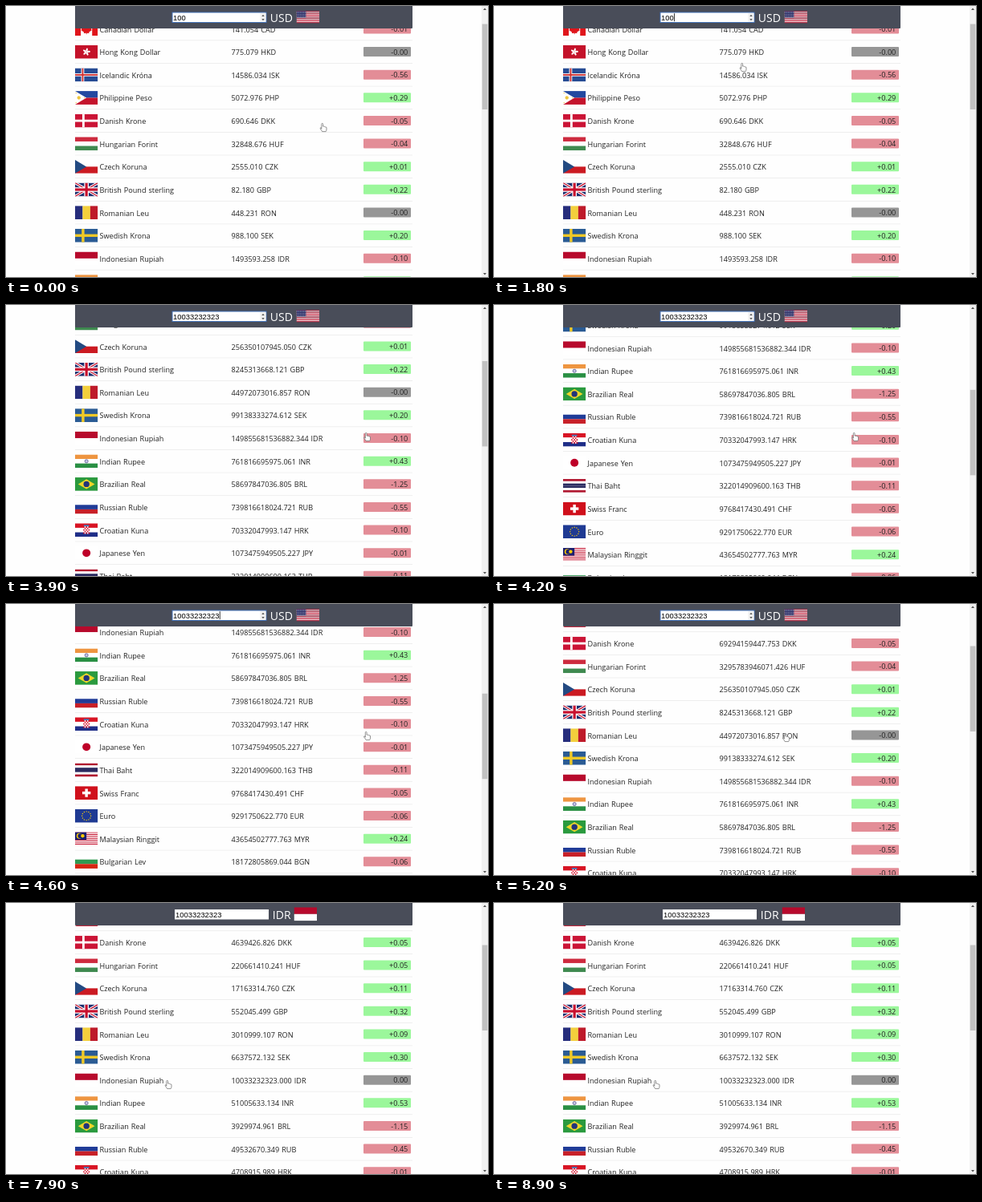
Write an HTML page that moves like this. It is 600 by 338 pixels and loops after 9000 ms.

```html
<!DOCTYPE html>
<html lang="en">
<head>
<meta charset="utf-8">
<title>Currency table</title>
<style>
  html, body { margin: 0; width: 100%; height: 100%; overflow: hidden; background: #fff; }
  svg { display: block; }
  #stage { width: 100vw; height: 100vh; }
  text { font: 9.1px "Open Sans", "Noto Sans", sans-serif; fill: #222; word-spacing: .6px; white-space: pre; }
  #code { font-size: 14px; fill: #fff; }
  #amount { font: 9.4px "Liberation Sans", Arial, sans-serif; fill: #000; }
</style>
</head>
<body>
<svg id="stage" viewBox="0 0 600 338">
  <defs id="flags"></defs>
  <rect width="600" height="338" fill="#fefefe"/>
  <g id="rows"></g>
  <rect x="86" y="-2" width="420" height="30" rx="1" fill="#494d59"/>
  <g id="entry">
    <rect x=".5" y="8" width="117" height="12.5" fill="#fff"/>
    <text id="amount" x="1.6" y="17.5"></text>
    <g id="focus">
      <rect x=".5" y="8" width="117" height="12.5" fill="none" stroke="#4472b8"/>
      <rect x="110" y="9" width="7" height="10.5" fill="#f0f0f0"/>
      <path d="M111.8 13l1.7-2.2 1.7 2.2zM111.8 16l1.7 2.2 1.7-2.2z" fill="#555"/>
      <rect id="caret" y="9.2" width=".8" height="10" fill="#000"/>
    </g>
  </g>
  <text id="code" y="20"></text>
  <use id="badge" width="28.5"/>
  <rect x="592" width="8" height="338" fill="#f1f1f1"/>
  <rect id="thumb" x="592.7" width="6.6" height="106.5" fill="#c1c1c1"/>
  <path d="M594 5l2-2.4 2 2.4zM594 333l2 2.4 2-2.4z" fill="#505050"/>
  <path id="hand" d="M-2.2 1.6V-4.2Q-2.2-5.2-1.3-5.2T-.4-4.2V-1.4Q.5-2 1.1-1.1Q2-1.6 2.6-.7Q4-1 4 .4V2.4Q4 3.6 3.2 5H-1.4Q-2.4 3.2-3.8 1.4Q-4.3.5-3.5.2T-2.2 1.6Z"
        fill="#fff" stroke="#666" stroke-width=".7" stroke-linejoin="round"/>
</svg>
<script>
const LOOP = 9000, STEP = 100, PITCH = 28.63, AMOUNT = '10033232323';
const $ = id => document.getElementById(id);

// Flag pieces, drawn on a 30 by 18 field
const rect = (x, y, w, h, fill) => `<rect x="${x}" y="${y}" width="${w}" height="${h}" fill="${fill}"/>`;
const path = (d, fill) => `<path d="${d}" fill="${fill}"/>`;
const disc = (x, y, r, fill) => `<circle cx="${x}" cy="${y}" r="${r}" fill="${fill}"/>`;
const field = fill => rect(0, 0, 30, 18, fill);
const bars = (...c) => c.map((k, i) => rect(0, i * 18 / c.length, 30, 18 / c.length + .02, k)).join('');
const poles = (...c) => c.map((k, i) => rect(i * 30 / c.length, 0, 30 / c.length + .02, 18, k)).join('');
const cross = (x, w, fill) => rect(x - w / 2, 0, w, 18, fill) + rect(0, 9 - w / 2, 30, w, fill);
const ring = (n, draw) => Array.from({ length: n }, (_, i) => draw(i * 2 * Math.PI / n)).join('');
const stripes = n => bars(...Array.from({ length: n }, (_, i) => i % 2 ? '#fff' : '#c4122f'));
const diagonals = (c, w) => `<path d="M0 0L30 18M30 0L0 18" stroke="${c}" stroke-width="${w}"/>`;
const checker = () => Array.from({ length: 25 }, (_, i) =>
  rect(10.8 + i % 5 * 1.7, 4 + (i / 5 | 0) * 2, 1.7, 2, i % 2 ? '#fff' : '#d8102a')).join('');
const stars = () => Array.from({ length: 30 }, (_, i) =>
  disc(1.3 + i % 6 * 2, 1.2 + (i / 6 | 0) * 1.8, .42, '#fff')).join('');

const flags = {
  USD: stripes(13) + rect(0, 0, 12.5, 9.7, '#35386e') + stars(),
  CAD: field('#fff') + rect(0, 0, 7.5, 18, '#e0151b') + rect(22.5, 0, 7.5, 18, '#e0151b') +
    path('M15 2l1.5 3 1.5-.8-.5 4 2-2 .5 1.3 2-.2-.8 2.4 1 .8-4 3 .4 1.3-3.2-.4V16h-.8v-1.6l-3.2.4.4-1.3-4-3 1-.8-.8-2.4 2 .2.5-1.3 2 2-.5-4 1.5.8z', '#e0151b'),
  HKD: field('#c4122a') + ring(5, a => `<ellipse cx="15" cy="6.3" rx="1.2" ry="2.4" fill="#fff" transform="rotate(${a * 180 / Math.PI + 12} 15 9)"/>`),
  ISK: field('#274c94') + cross(10, 4, '#fff') + cross(10, 2, '#d03030'),
  PHP: bars('#2349a0', '#c4142c') + path('M0 0L15 9 0 18z', '#fff') + disc(5, 9, 2.3, '#eec640') +
    disc(1.3, 2.6, .7, '#eec640') + disc(1.3, 15.4, .7, '#eec640') + disc(12.3, 9, .7, '#eec640'),
  DKK: field('#cb1436') + cross(11, 3, '#fff'),
  HUF: bars('#cd2a3e', '#fff', '#3f8a50'),
  CZK: bars('#fff', '#cb1a22') + path('M0 0L15 9 0 18z', '#234a82'),
  GBP: field('#1d2f6f') + diagonals('#fff', 3.6) + diagonals('#c8102e', 1.3) + cross(15, 6, '#fff') + cross(15, 3.4, '#c8102e'),
  RON: poles('#262d7c', '#f3cf3c', '#be1a2a'),
  SEK: field('#2a5b94') + cross(10.5, 3.6, '#f0c926'),
  IDR: bars('#b70a2c', '#fff'),
  INR: bars('#ee9540', '#fff', '#2a9044') + `<circle cx="15" cy="9" r="2.2" fill="#c7c7e4" stroke="#26266f" stroke-width=".6"/>`,
  BRL: field('#2a9a3e') + path('M15 2.4L26 9 15 15.6 4 9z', '#eed629') + disc(15, 9, 3.9, '#22357a'),
  RUB: bars('#fff', '#203c98', '#c82028'),
  HRK: bars('#d81424', '#fff', '#1f2e88') + checker() + rect(11.5, 2.2, 7, 1.8, '#3f7fc0'),
  JPY: field('#fff') + disc(15, 9, 5.3, '#be0028'),
  THB: bars('#b0162f', '#fff', '#2b2b60', '#2b2b60', '#fff', '#b0162f'),
  CHF: field('#d0101c') + rect(13.2, 3.5, 3.6, 11, '#fff') + rect(9.5, 7.2, 11, 3.6, '#fff'),
  EUR: field('#1f3a93') + ring(12, a => disc(15 + 5.8 * Math.sin(a), 9 - 5.8 * Math.cos(a), .75, '#fc0')),
  MYR: stripes(14) + rect(0, 0, 15, 10.3, '#1b1f70') + disc(5.6, 5.1, 3.7, '#fc0') + disc(6.8, 5.1, 3.2, '#1b1f70') + disc(10, 5.1, 2.3, '#fc0'),
  BGN: bars('#fff', '#2f9b52', '#d62612')
};
$('flags').innerHTML = Object.entries(flags).map(([code, art]) =>
  `<symbol id="${code}" viewBox="0 0 30 18" preserveAspectRatio="none">${art}</symbol>`).join('');

// Code, name, units per euro, daily change against the dollar
const currencies = [
  ['CAD', 'Canadian Dollar', 1.5231, -.012],
  ['HKD', 'Hong Kong Dollar', 8.3693, -.002],
  ['ISK', 'Icelandic Króna', 157.5, -.56],
  ['PHP', 'Philippine Peso', 54.778, .29],
  ['DKK', 'Danish Krone', 7.4576, -.0502],
  ['HUF', 'Hungarian Forint', 354.7, -.043],
  ['CZK', 'Czech Koruna', 27.589, .009],
  ['GBP', 'British Pound sterling', .88738, .219],
  ['RON', 'Romanian Leu', 4.84, -.004],
  ['SEK', 'Swedish Krona', 10.6695, .202],
  ['IDR', 'Indonesian Rupiah', 16127.82, -.097],
  ['INR', 'Indian Rupee', 81.9885, .43],
  ['BRL', 'Brazilian Real', 6.3172, -1.246],
  ['RUB', 'Russian Ruble', 79.6208, -.55],
  ['HRK', 'Croatian Kuna', 7.5693, -.103],
  ['JPY', 'Japanese Yen', 115.53, -.012],
  ['THB', 'Thai Baht', 34.656, -.11],
  ['CHF', 'Swiss Franc', 1.0513, -.05],
  ['EUR', 'Euro', 1, -.06],
  ['MYR', 'Malaysian Ringgit', 4.6982, .24],
  ['BGN', 'Bulgarian Lev', 1.9558, -.06]
].map(([code, name, quote, change]) => ({ code, name, quote, change }));

$('rows').innerHTML = currencies.map(({ code, name }, i) => `<g transform="translate(0 ${28.6 + i * PITCH})">
  <use href="#${code}" x="86" y="-8.4" width="28.3" height="16.8"/>
  <text x="116.5" y="3.9">${name}</text><text class="value" x="280.6" y="3.9"></text>
  <rect class="cell" x="445" y="-6.2" width="59" height="12" rx="1"/>
  <text class="change" x="500.3" y="3.5" text-anchor="end"></text>
  <rect x="86" y="13.9" width="420" height=".7" fill="#e9e9e9"/></g>`).join('');
const [values, cells, changes] = ['value', 'cell', 'change'].map(c => document.querySelectorAll('.' + c));

const bases = {
  USD: { quote: 1.0798, change: 0, input: 206.5, label: 328.8, flag: 361.5 },
  RON: { ...currencies.find(c => c.code === 'RON'), input: 205.5, label: 327.8, flag: 362.5 },
  IDR: { ...currencies.find(c => c.code === 'IDR'), input: 209.5, label: 331.8, flag: 358.5 }
};

const smooth = p => p * p * (3 - 2 * p);
const linear = p => p;
function track(t, keys, ease) {
  const i = keys.findIndex(k => k[0] > t);
  if (i === 0) return keys[0].slice(1);
  if (i < 0) return keys[keys.length - 1].slice(1);
  const [from, to] = [keys[i - 1], keys[i]];
  const p = ease((t - from[0]) / (to[0] - from[0]));
  return from.slice(1).map((v, k) => v + (to[k + 1] - v) * p);
}
const pointer = [[0, 395, 152], [900, 395, 152], [1800, 310, 77], [2300, 449.5, 165],
  [4900, 449.5, 165], [5600, 231, 170], [7000, 231, 170], [7600, 202, 227]];
const scrolling = [[3500, 0], [3900, 148.7], [4250, 280], [4600, 279.7], [4900, 94]];

function showTable(code, typed) {
  const base = bases[code];
  currencies.forEach((c, i) => {
    const rate = Number((c.quote / base.quote).toFixed(10));
    const diff = c.change - base.change, shown = diff.toFixed(2), flat = Number(shown) === 0;
    values[i].textContent = `${(rate * Number(typed)).toFixed(3)} ${c.code}`;
    changes[i].textContent = (diff > 0 ? '+' : '') + shown;
    cells[i].setAttribute('fill', flat ? '#969696' : diff > 0 ? '#9bf79b' : '#e38d97');
  });
  $('entry').setAttribute('transform', `translate(${base.input} 0)`);
  $('amount').textContent = typed;
  $('code').textContent = code;
  $('code').setAttribute('x', base.label);
  const height = code === 'USD' ? 15.2 : 17;
  const badge = { href: '#' + code, x: base.flag, y: 13.8 - height / 2, height };
  for (const k in badge) $('badge').setAttribute(k, badge[k]);
}

let shownState = '';
function render(t) {
  const code = t < 5700 ? 'USD' : t < 7700 ? 'RON' : 'IDR';
  const keys = Math.max(0, Math.min(8, Math.floor((t - 2200) / 135) + 1));
  const typed = AMOUNT.slice(0, 3 + keys);
  if (shownState !== code + typed) showTable(code, typed);
  shownState = code + typed;

  const blink = t < 2200 ? t + 130 : t - 3170 + 530;
  const caretOn = t >= 2200 && t < 3170 || Math.floor(blink / 530) % 2 === 1;
  $('focus').style.display = code === 'USD' ? '' : 'none';
  $('caret').style.display = caretOn ? '' : 'none';
  $('caret').setAttribute('x', 1.8 + typed.length * 9.4 * .556);

  const [scroll] = track(t, scrolling, linear);
  $('rows').setAttribute('transform', `translate(0 ${-scroll})`);
  $('thumb').setAttribute('y', 22.5 + scroll * .319);
  const [x, y] = track(t, pointer, smooth);
  $('hand').setAttribute('transform', `translate(${x} ${y - .4})`);
}

const start = performance.now();
function tick() {
  const t = (performance.now() - start) % LOOP;
  render(Math.floor(t / STEP) * STEP);
  requestAnimationFrame(tick);
}
tick();
</script>
</body>
</html>
```
